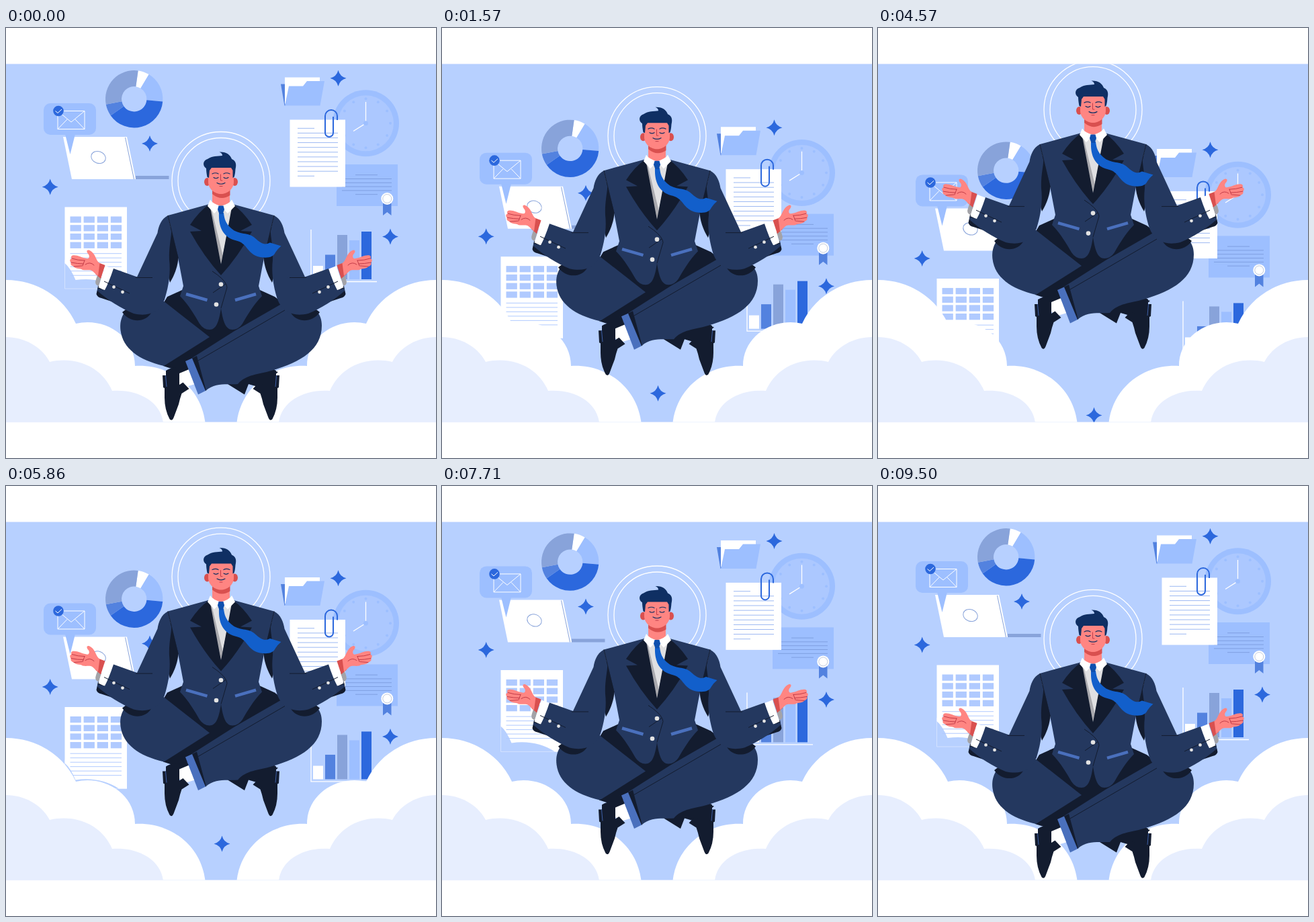
Animation of 640x640 px, one loop 9.57 s. Source, as an HTML page:

```html
<!DOCTYPE html>
<html lang="en">
<head>
<meta charset="utf-8">
<title>Calm above the clouds</title>
<style>
html, body { margin: 0; width: 100%; height: 100%; overflow: hidden; background: #fff; }
svg { display: block; width: 100vw; height: 100vh; }
.pale { fill: #9dbfff; }
.mid { fill: #5382df; }
.blue { fill: #2c68dd; }
.dusk { fill: #88a3da; }
.suit { fill: #24385f; }
.dark { fill: #131c2f; }
.skin { fill: #ff8582; }
.red { fill: #d9504f; }
.hair { fill: #0f2f63; }
.white { fill: #fff; }
.line { fill: none; stroke-width: 1; }
.seam { fill: none; stroke: #131c2f; stroke-width: 1; }
.crease { fill: none; stroke: #c23c48; stroke-width: 1; stroke-linecap: round; }
.face { fill: none; stroke: #0f2f63; stroke-width: 1.2; stroke-linecap: round; }
.button { fill: #e3e3e3; }
</style>
</head>
<body>
<svg viewBox="0 0 640 640" preserveAspectRatio="none">
<defs>
  <clipPath id="sky"><rect y="53.5" width="640" height="533"/></clipPath>
  <path id="spark" class="blue" d="M0-12Q2.4-2.4 12 0Q2.4 2.4 0 12Q-2.4 2.4-12 0Q-2.4-2.4 0-12Z"/>
  <g id="cloud">
    <path class="white" d="M0 375C45 375 86 400 104 440C145 430 192 457 192 503C245 500 290 535 296.500 587H0Z"/>
    <path fill="#e7eefe" d="M0 460C27 460 53 474 65 497C105 488 143 505 158 540C195 537 230 555 234 587H0Z"/>
  </g>
  <g id="shoe">
    <path class="dark" d="M233 517H238V510C246 505 255 504 282 504L258 514V531L263.500 527.500L272.500 537L261.500 544Q259 551 257 560L249.500 580Q247 586 243.500 582Q236 568 236 550V536L234 535Z"/>
    <path d="M237.500 517L239 534" class="line" stroke="#3d5fa6"/>
  </g>
  <g id="arm">
    <path class="dark" d="M245 296C236 335 239 362 244 379C252 366 256 352 256.500 342Z"/>
    <path class="dark" d="M137 384L134.500 396Q136 401 142 402L160 408L150 384Z"/>
    <path fill="#a3a3a8" d="M136 368L142 371L138 384Q131 382 134 374Z"/>
    <path class="red" d="M137 349L147.500 353L141 373L133 366Z"/>
    <path class="skin" d="M139.500 350C133 346 134 335 123.500 330.500C119 330 120 334 123 337C125 341 123 344 120 343C113 342 105 337 99 338.500C96 340 97 342 98 343C94 344 95 348 97 349C95 352 98 354 101 355C103 359 110 357 114 360C121 361 125 359 129 362C133 366 135 367 137 369Z"/>
    <path class="crease" d="M98 343Q107 346 117 346M97 349Q107 351 115 351M101 355L113 354M117 346L114 354M118 352Q125 347 131 353"/>
    <path class="white" d="M148 354L161 359L150 392L137.500 386Z"/>
    <path class="suit" d="M241 279C231 284 227 295 225.500 305L195 370.500L160 358Q153 379 147 390Q140 389 136 387L136 391C150 404 172 418 190 425C211 430 228 424 236 404C243 382 245 362 243 345C242 325 247 308 246 301Z"/>
    <path class="seam" d="M193 371.500H218M146 377L184 395M241 279L256 342"/>
    <circle class="button" cx="160.500" cy="385.500" r="2.400"/>
    <circle class="button" cx="173.500" cy="393" r="2.400"/>
  </g>
  <path id="lapel" class="dark" d="M303 262Q287 273 274 293L291 302L274 303Q295 341 320 368V352Z"/>
</defs>
<g clip-path="url(#sky)">
  <rect width="640" height="640" fill="#b7d0ff"/>

  <g id="things">
    <!-- pie -->
    <g id="pie"></g>
    <!-- laptop and mail -->
    <path class="white" d="M85 162H180L193 225H98Z"/>
    <path class="dusk" d="M193 220H242.500V225H193Z"/>
    <path class="line" stroke="#88a3da" d="M177.500 163L190.500 225"/>
    <ellipse class="line" stroke="#88a3da" cx="137.500" cy="192.500" rx="11" ry="8.800" transform="rotate(20 137.500 192.500)"/>
    <path class="pale" d="M88 158H103L95.500 188Z"/>
    <rect class="pale" x="56" y="112" width="78" height="47" rx="10"/>
    <path class="line" stroke="#fff" d="M77 123.500H117V150.500H77ZL97 140L117 123.500M77 150.500L91 136M117 150.500L103 136"/>
    <circle class="blue" cx="78" cy="123.500" r="7.800"/>
    <path class="line" stroke="#fff" d="M73.500 123.500L77 126.500L83 121"/>
    <!-- calendar -->
    <path class="line" stroke="#d3e1ff" d="M87.500 345V388H180"/>
    <path class="white" d="M87.500 266.500H180V388H168Q140 370 103.500 375Q96 357 87.500 350Z"/>
    <g id="cells" fill="#b0caff"></g>
    <g id="rows" class="line" stroke="#b0caff"></g>
    <!-- folder -->
    <path class="mid" d="M409 83.500H416V115.500H414.500Z"/>
    <path class="white" d="M415 73.500H467V90L415 113Z"/>
    <path class="pale" d="M421 86.500H442L448 79H474L467.500 115.500H415Z"/>
    <!-- clock -->
    <circle class="pale" cx="535.500" cy="141.800" r="49.500"/>
    <circle fill="#acc8ff" cx="535.500" cy="141.800" r="41.500"/>
    <g id="dots" class="pale"></g>
    <path class="line" stroke="#fff" style="stroke-width:1.300" d="M535.500 110V141.800L517 153.500"/>
    <circle class="pale" cx="535.500" cy="141.800" r="3.500"/>
    <!-- certificate -->
    <rect class="pale" x="492" y="203" width="91" height="62"/>
    <g id="award" class="line" stroke="#7f9fe0"></g>
    <path class="mid" d="M561 260H573.500V279L567.300 274L561 279Z"/>
    <circle class="white" cx="567.300" cy="254" r="9"/>
    <circle class="line" stroke="#c3cbdc" cx="567.300" cy="254" r="6.500"/>
    <!-- letter -->
    <rect class="white" x="422.500" y="136.500" width="82.500" height="100"/>
    <g id="letter" class="line" stroke="#9cb8f2"></g>
    <path class="line" stroke="#2c68dd" style="stroke-width:2" d="M493 137V131A9 9 0 0 0 475 131V156A6 6 0 0 0 487 156V132"/>
    <!-- chart -->
    <path class="line" stroke="#fff" style="stroke-width:1.300" d="M454 300V377.500H552"/>
    <g id="bars"></g>
    <g id="sparks"></g>
  </g>

  <use href="#cloud"/>
  <use href="#cloud" transform="matrix(-1 0 0 1 640 0)"/>

  <g id="man">
    <g class="line" stroke="#fff" style="stroke-width:1.300">
      <circle cx="320" cy="227.500" r="73"/>
      <circle cx="320" cy="227.500" r="64"/>
    </g>
    <!-- legs -->
    <path class="dark" d="M240 400L262 390H378L400 400L413 410L290 500L262 512L234 503L225 425Z"/>
    <path class="white" d="M258 511L270 504L281 530L265 535L258 528Z"/>
    <path class="dark" d="M330 530L355 545.500L361 530L378 535L405 512L380 505Z"/>
    <use href="#shoe"/>
    <use href="#shoe" transform="matrix(-1 0 0 1 640 0)"/>
    <path class="suit" d="M234 406L303 460L235 503C197 494 174 477 170.500 450C169 438 172 430 177 422Z"/>
    <path class="suit" d="M413 409L340 451L277 491L297 540C312 527 328 531 345 530C358 515 375 516 395 510C440 497 470 478 470 443C470 433 467 427 463 422Z"/>
    <path class="dark" d="M276 492L284 488L298 540L292 538Z"/>
    <path fill="#4a70bd" d="M267 496L277 491.500L297 540L286 545.500Z"/>
    <path class="seam" d="M286 495L415 420M237 503L300 465"/>
    <path class="dark" d="M173 423C185 440 208 438 216 424L236 404L190 410ZM467 423C455 440 432 438 424 424L404 404L450 410Z"/>
    <!-- jacket -->
    <path class="suit" d="M303 262L241 279L256 342L264 384L259 399C272 412 281 428 288 440Q294 449 303 449C313 449 317 437 320 417C323 437 327 449 337 449Q346 449 352 440C359 428 368 412 381 399L376 384L384 342L399 279L337 262Z"/>
    <use href="#arm"/>
    <use href="#arm" transform="matrix(-1 0 0 1 640 0)"/>
    <path fill="#e0e0e2" d="M302 265H338L320 352Z"/>
    <path fill="#a9a9ae" d="M302 268L306 270L323 340L320 352Z"/>
    <use href="#lapel"/>
    <use href="#lapel" transform="matrix(-1 0 0 1 640 0)"/>
    <path class="seam" d="M307 362Q324 373 328 382L329 386L320 417M327 381L308 394"/>
    <path class="line" stroke="#4a70bd" style="stroke-width:4.500" d="M268 396L299.500 405M341 405L372 396"/>
    <circle class="button" cx="320" cy="381.500" r="3.300"/>
    <circle class="button" cx="313" cy="411.500" r="3.300"/>
    <!-- neck, collar, tie -->
    <path class="skin" d="M307 236H333V262L320 268L307 262Z"/>
    <path class="red" d="M307 236H333.500V249Q320 258 307 247Z"/>
    <path class="white" d="M304 255.500Q308 262 320 265Q332 262 336 255.500L341 265L330 276L320 266L310 276L300 265Z"/>
    <path fill="#125fcb" d="M317 275C316 296 323 311 341 316C361 320 357 336 378 341C390 343 398 341 401 334Q404 329 409.500 324.500L393 319.500C384 324 379 320 371 313C361 303 347 309 335 298C327 291 325 284 324 275Z"/>
    <path fill="#0e4fae" d="M316.500 264.500H323.500L325 270L322.500 277H317.500L315 270Z"/>
    <!-- head -->
    <ellipse class="red" cx="299.500" cy="229" rx="4.500" ry="6"/>
    <ellipse class="red" cx="340.500" cy="229" rx="4.500" ry="6"/>
    <path class="skin" d="M301 205H339V229C339 240 329 247 320 247C311 247 301 240 301 229Z"/>
    <path class="hair" d="M302 223L299.500 222Q298 214 298 209C292 205 293 197 300 195C307 190 315 191 322 190Q322 186 317.500 184.500C328 184 334 189 336 195C343 198 343 204 341.500 210Q341 218 339.500 222L337.500 223V212L335 208H306L303 212Z"/>
    <path class="face" d="M307 217Q312 214.500 316 217M324 217Q328 214.500 333 217M309 222.500Q312.500 225 316 222.500M324 222.500Q327.500 225 331 222.500M314 230.500Q320 234 326 230.500"/>
    <path class="crease" d="M319.500 218V227H322M318 235.500H322"/>
  </g>
</g>
</svg>
<script>
const $ = id => document.getElementById(id);
const fill = (id, html) => { $(id).innerHTML = html; };
const range = n => [...Array(n).keys()];
const rule = (x1, x2, y) => `<path d="M${x1} ${y}H${x2}"/>`;
const box = (x, y, w, h, cls = '') => `<rect class="${cls}" x="${x}" y="${y}" width="${w}" height="${h}"/>`;

// point on a circle, degrees clockwise from the top
const polar = (cx, cy, r, deg) => {
  const a = deg * Math.PI / 180;
  return [cx + r * Math.sin(a), cy - r * Math.cos(a)];
};

const slice = (from, to, cls) => {
  const p = (r, a) => polar(190.7, 105.7, r, a).join(' ');
  const big = to - from > 180 ? 1 : 0;
  return `<path class="${cls}" d="M${p(42.7, from)}A42.7 42.7 0 ${big} 1 ${p(42.7, to)}L${p(18.7, to)}A18.7 18.7 0 ${big} 0 ${p(18.7, from)}Z"/>`;
};

fill('pie', slice(8, 31, 'white') + slice(31, 95, 'pale') + slice(95, 235, 'blue') +
  slice(235, 259, 'mid') + slice(259, 368, 'dusk'));
fill('cells', range(16).map(i => box(95.5 + i % 4 * 20.1, 280.5 + (i >> 2) * 12.7, 16.3, 9.3)).join(''));
fill('rows', range(6).map(i => rule(95.5, 172, 335.7 + i * 6.5)).join(''));
fill('dots', range(12).map(i => {
  const [x, y] = polar(535.5, 141.8, 36.5, i * 30);
  return `<circle cx="${x}" cy="${y}" r="2"/>`;
}).join(''));
fill('award', range(6).map(i => {
  const short = i % 5 === 0;
  return rule(short ? 520 : 500, short ? 553 : 574, 218.7 + i * 5.8);
}).join(''));
fill('letter', range(11).map(i => rule(434, i % 10 ? 494 : 459, 149.3 + i * 7.1)).join(''));
fill('bars', [[354, 'white'], [337.5, 'mid'], [308, 'dusk'], [316, 'pale'], [303, 'blue']]
  .map(([y, cls], i) => box(457 + i * 18, y, 15, 374 - y, cls)).join(''));
fill('sparks', [[494.5, 74.7], [214, 172], [65.7, 236.5], [572, 310.5], [321.5, 470]]
  .map(([x, y]) => `<use href="#spark" x="${x}" y="${y}"/>`).join(''));

// cubic Bezier easing, solved by bisection
const bezier = (x1, y1, x2, y2) => u => {
  const at = (a, b, s) => 3 * (1 - s) ** 2 * s * a + 3 * (1 - s) * s * s * b + s ** 3;
  let lo = 0, hi = 1;
  for (let i = 0; i < 30; i++) {
    const s = (lo + hi) / 2;
    if (at(x1, x2, s) < u) lo = s; else hi = s;
  }
  return at(y1, y2, lo);
};

const LOOP = 9570, FPS = 14, HALF = 67;
const lift = bezier(.167, .167, .26, 1);
const sink = bezier(.333, 0, .667, 1);
const drop = bezier(.3, 0, 0, 1);
const climb = bezier(.333, 0, 0, 1);

const swing = (u, out, back) => u < 1 ? out(u) : 1 - back(u - 1);
const shift = (id, y) => $(id).setAttribute('transform', `translate(0 ${y.toFixed(2)})`);

const start = performance.now();
function draw() {
  const t = (performance.now() - start) % LOOP;
  const u = Math.floor((t + 5) * FPS / 1000) / HALF % 2;
  shift('man', -106 * swing(u, lift, sink));
  shift('things', 106.5 * swing(u, drop, climb));
  requestAnimationFrame(draw);
}
draw();
</script>
</body>
</html>
```
